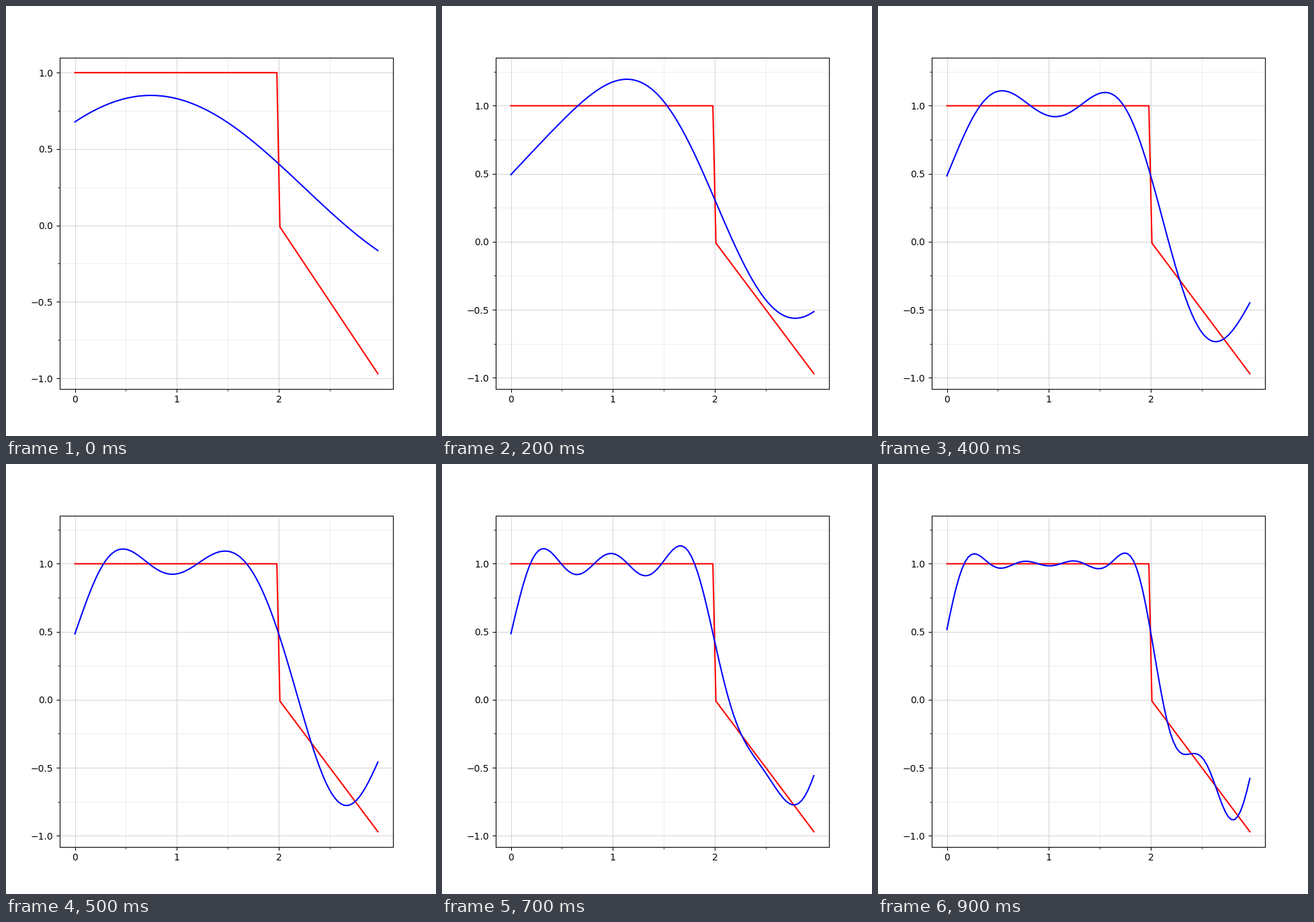
These frames come from a looping animation (640x640 px, 1 s). A matplotlib script:

```python
import numpy as np
import matplotlib.pyplot as plt
from matplotlib.animation import FuncAnimation
from matplotlib.ticker import MultipleLocator

TERMS = 10
INTERVAL = 100
HALF_PERIOD = 3.0  # the signal is zero on [-3, 0)

x = np.arange(100) * 0.03
signal = np.where(x < 2, 1.0, 2 - x)


def harmonic(n):
    """n-th Fourier term of: 1 on [0, 2), 2 - t on [2, 3)."""
    w = n * np.pi / HALF_PERIOD
    s2, c2, s3, c3 = np.sin(2 * w), np.cos(2 * w), np.sin(3 * w), np.cos(3 * w)
    a = s2 / w - s3 / w + (c2 - c3) / w**2
    b = (1 - c2) / w + c3 / w + (s2 - s3) / w**2
    return (a * np.cos(w * x) + b * np.sin(w * x)) / HALF_PERIOD


mean = 1.5 / (2 * HALF_PERIOD)
curves = mean + np.cumsum([harmonic(n) for n in range(1, TERMS + 1)], axis=0)

fig, ax = plt.subplots(figsize=(6.4, 6.4), dpi=100)
ax.plot(x, signal, color="red")
partial_sum, = ax.plot(x, curves[0], color="blue")

ax.set_xticks(range(3))
ax.set_xticks(np.arange(0, 3, 0.5), minor=True)
ax.yaxis.set_major_locator(MultipleLocator(0.5))
ax.yaxis.set_minor_locator(MultipleLocator(0.25))
ax.grid(which="major", alpha=0.5)
ax.grid(which="minor", alpha=0.2)
pad = 0.05 * (x[-1] - x[0])
ax.set_xlim(x[0] - pad, x[-1] + pad)


def update(i):
    partial_sum.set_ydata(curves[i])
    # The view only ever grows to hold every curve drawn so far.
    low = min(signal.min(), curves[:i + 1].min())
    high = max(signal.max(), curves[:i + 1].max())
    margin = 0.05 * (high - low)
    ax.set_ylim(low - margin, high + margin)
    return partial_sum,


anim = FuncAnimation(fig, update, frames=TERMS, interval=INTERVAL,
                     repeat=True, repeat_delay=0)
plt.show()
```
